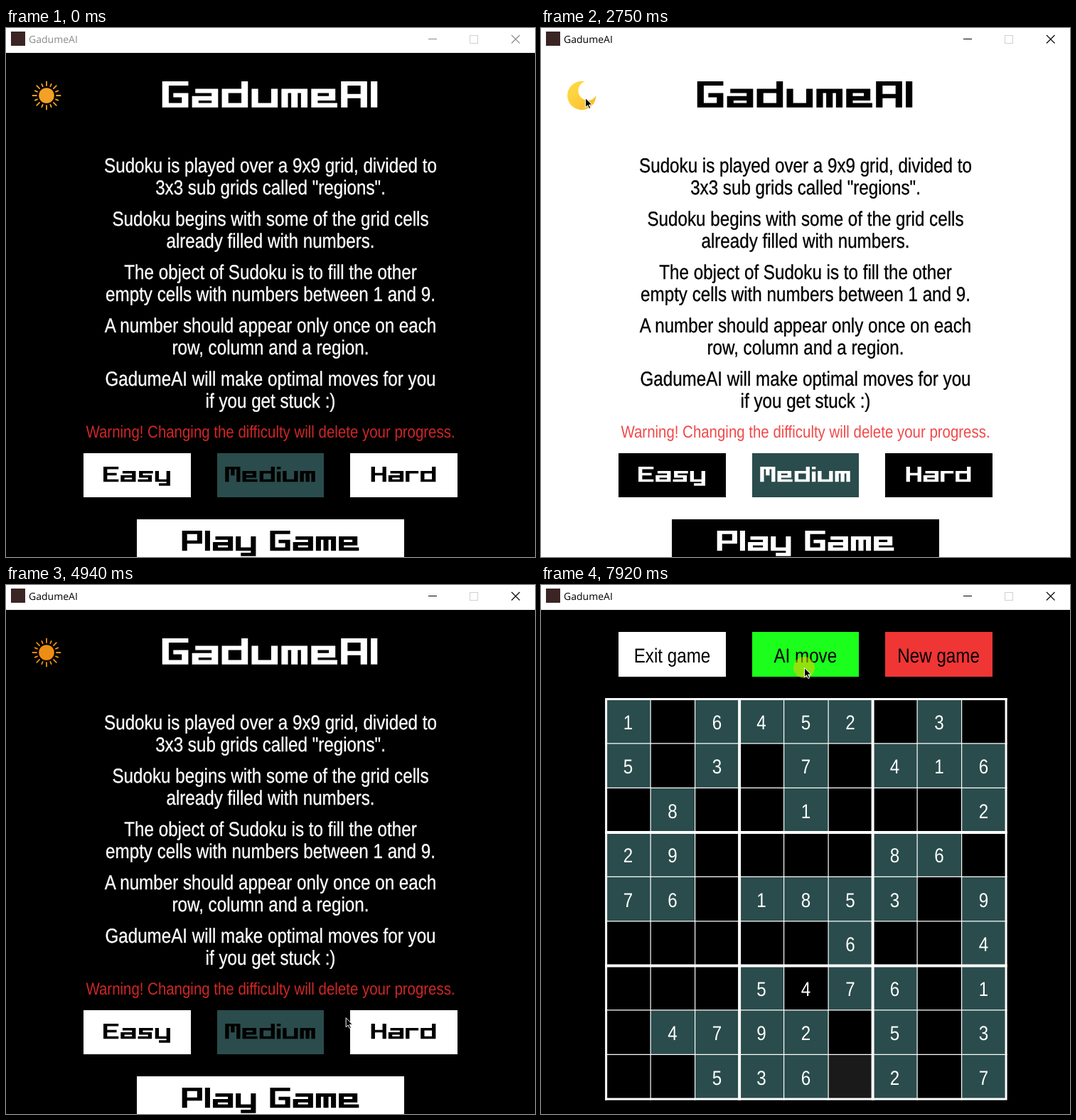
An HTML page for the animation above (8000 ms loop, 744 by 744 pixels).

```html
<!DOCTYPE html>
<html lang="en">
<head>
<meta charset="utf-8">
<title>GadumeAI</title>
<style>
html, body { margin: 0; width: 100%; height: 100%; overflow: hidden; background: #fff; }
svg { display: block; width: 100vw; height: 100vh; --bg: #000; --fg: #fff; --warn: #d02626; --win: #000; }
svg.light { --bg: #fff; --fg: #000; --warn: #f24848; }
svg.idle { --win: #8a8a8a; }
rect { shape-rendering: crispEdges; }
text { font-family: "Liberation Sans", Arial, sans-serif; text-anchor: middle; text-rendering: geometricPrecision; }
.caption { font-family: "Open Sans", sans-serif; text-anchor: start; fill: var(--win); }
.pixel { fill: none; stroke-linecap: square; stroke-linejoin: miter; }
</style>
</head>
<body>
<svg id="stage" viewBox="0 0 744 744"></svg>
<script>
const LOOP = 8000, SLATE = '#2a4c4c';
const stage = document.getElementById('stage');

// Block letters drawn with a 1 x 1 pen, 4 columns by 6 rows
const glyphs = {
  G: 'M3.5 .5H.5V5.5H3.5V3.2H2.2', a: 'M1 2.2H3.5V5.5H.5V3.9H3.5', d: 'M3.5 .5V5.5H.5V2.2H3.5',
  u: 'M.5 2.2V5.5H3.5V2.2', m: 'M.5 5.5V2.2H3.5V5.5M2 2.2V5.5', e: 'M3.5 5.5H.5V2.2H3.2V3.9H.5',
  A: 'M.5 5.5V.5H3.5V5.5M.5 3.4H3.5', I: 'M.5 .5V5.5', E: 'M3.5 .5H.5V5.5H3.5M.5 3H3',
  s: 'M3.5 2.2H.8V3.9H3.2V5.5H.5', y: 'M.5 2.2V5.5H3.5M3.5 2.2V7.1H1.5', M: 'M.5 5.5V.5H3.5V5.5M2 .5V3',
  i: 'M.5 2.4V5.5M.5 .5h.01', H: 'M.5 .5V5.5M3.5 .5V5.5M.5 3H3.5', r: 'M.5 5.5V2.2H2.9',
  P: 'M.5 5.5V.5H3.5V3.4H.5', l: 'M.5 .5V5.5', ' ': ''
};
const narrow = { I: 1, l: 1, i: 1, r: 3.4, ' ': 1.7 };
const GAP = .57;

function pixelText(str, cx, top, unit, color) {
  let x = 0;
  const paths = [...str].map(c => {
    const path = `<path transform="translate(${x} 0)" d="${glyphs[c]}"/>`;
    x += (narrow[c] || 4) + GAP;
    return path;
  }).join('');
  const sx = 1.75 * unit, sy = 7 / 6 * unit;
  return `<g class="pixel" stroke="${color}" transform="translate(${cx - (x - GAP) * sx / 2} ${top}) scale(${sx} ${sy})">${paths}</g>`;
}

const rect = (x, y, w, h, fill, extra = '') =>
  `<rect x="${x}" y="${y}" width="${w}" height="${h}" fill="${fill}" ${extra}/>`;
const text = (str, x, y, size = 24.2, fill = 'var(--fg)', extra = '') =>
  `<text transform="translate(${x} ${y}) scale(1 1.17)" font-size="${size}" fill="${fill}" ${extra}>${str}</text>`;
const bold = 'stroke="var(--fg)" stroke-width=".3"';

function sun() {
  let rays = '';
  for (let i = 0; i < 16; i++)
    rays += `<path d="M0 -14V${i % 2 ? -17.5 : -19.5}" transform="rotate(${i * 22.5})"/>`;
  return `<g id="sun" transform="translate(57 95)" fill="currentColor" stroke="currentColor">
    <g stroke-width="1.8" stroke-linecap="round">${rays}</g><circle r="10.8" stroke="none"/>
    <path id="sunHalf" d="M0 -10.8A10.8 10.8 0 0 0 0 10.8Z" fill="#ffc12c" stroke="none"/></g>`;
}

function menu() {
  const lines = [
    'Sudoku is played over a 9x9 grid, divided to', '3x3 sub grids called "regions".',
    'Sudoku begins with some of the grid cells', 'already filled with numbers.',
    'The object of Sudoku is to fill the other', 'empty cells with numbers between 1 and 9.',
    'A number should appear only once on each', 'row, column and a region.',
    'GadumeAI will make optimal moves for you', 'if you get stuck :)'
  ];
  const levels = ['Easy', 'Medium', 'Hard'].map((name, i) =>
    rect(109.4 + i * 187.5, 597.5, 150.3, 62.5, i === 1 ? SLATE : 'var(--fg)') +
    pixelText(name, 184 + i * 187.5, 617, 3.03, 'var(--bg)'));
  return sun() +
    '<path id="moon" fill="url(#gold)" d="M62 75.3A20.2 20.2 0 1 0 77.500 95A13.500 13.500 0 1 1 62 75.300Z"/>' +
    pixelText('GadumeAI', 371, 75, 5.24, 'var(--fg)') +
    lines.map((s, i) => text(s, 372, 203 + (i >> 1) * 75 + i % 2 * 31, 24.2, 'var(--fg)', bold)).join('') +
    text('Warning! Changing the difficulty will delete your progress.', 372, 575.5, 20.45, 'var(--warn)') +
    levels.join('') +
    rect(184.4, 691, 375.2, 60, 'var(--fg)') + pixelText('Play Game', 372, 707, 4.03, 'var(--bg)');
}

function game() {
  const givens = ['1.6452.3.', '5.3.7.416', '.8..1...2', '29....86.', '76.1853.9',
    '.....6..4', '...5.76.1', '.4792.5.3', '..536.2.7'];
  const step = 62.5, left = 91.6, top = 160.4, side = step * 9;
  const digit = (n, col, row, extra) => text(n, 122.5 + col * step, 202.5 + row * step, 24.2, '#fff', extra);
  let out = ['Exit game', 'AI move', 'New game'].map((s, i) =>
    rect(109.4 + i * 187.5, 66.4, 150.3, 62.4, ['#fff', '#1cff1c', '#f03535'][i]) +
    text(s, 184.5 + i * 187.3, 108.5, 24.2, '#000')).join('');
  givens.forEach((line, row) => [...line].forEach((n, col) => {
    if (n !== '.') out += rect(left + col * step, top + row * step, step, step, SLATE) + digit(n, col, row);
  }));
  out += rect(left + 5 * step, top + 8 * step, step, step, '#1a1a1a');
  for (let i = 0; i < 10; i++) {
    const x = left + i * step, y = top + i * step, w = i % 9 === 0 ? 3 : i % 3 ? 1.2 : 4;
    out += `<path stroke="#fff" stroke-width="${w}" d="M${x} ${top - 1.5}v${side + 3}M${left - 1.5} ${y}h${side + 3}"/>`;
  }
  return out + digit(4, 4, 6, 'id="aiDigit"');
}

stage.innerHTML = `
  <defs><linearGradient id="gold" x2="1" y2="1">
    <stop offset=".3" stop-color="#ffd540"/><stop offset="1" stop-color="#f7b92c"/>
  </linearGradient></defs>
  ${rect(0, 0, 744, 744, 'var(--bg)')}${rect(0, 0, 744, 35, '#fff')}
  ${rect(7, 5, 20, 20, '#3b2424')}
  <text class="caption" x="32" y="21" font-size="14">GadumeAI</text>
  <path d="M594 15.5H606M711 10L722.5 21.5M722.5 10L711 21.5" stroke="var(--win)" stroke-width="1.1"/>
  ${rect(652.5, 10.5, 11, 11, 'none', 'stroke="#d0d0d0"')}
  <g id="menu">${menu()}</g><g id="game">${game()}</g>
  <g id="pointer"><circle id="press" r="15" fill="rgba(255,200,0,.5)"/>
  <path d="M.5 .5V13.5L3.5 10.8L5.7 15.5L7.8 14.6L5.7 10H9.8Z" fill="#000" stroke="#fff"/></g>`;

const el = id => document.getElementById(id);
const show = (id, on) => { el(id).style.display = on ? '' : 'none'; };
const within = (t, a, b) => t >= a && t < b;

// Pointer moves: start, end, number of steps, x, y
const moves = [
  [400, 630, 6, 453, 411], [990, 1320, 8, 280, 305], [1600, 1750, 4, 106, 151],
  [1970, 2390, 9, 62, 98], [4330, 4560, 6, 328, 386], [4790, 4980, 5, 495, 634],
  [5210, 5700, 9, 447, 712], [6330, 6560, 6, 396, 271], [6920, 7020, 3, 382, 119],
  [7300, 7490, 4, 370, 116]
];
const presses = [[2570, 2670], [3640, 3670], [5830, 5860], [7640, 7820], [7920, 8000]];

function pointerAt(t) {
  let x = 643, y = 752;
  for (const [start, end, steps, toX, toY] of moves) {
    if (t < start) break;
    const n = Math.floor((t - start) / (end - start) * (steps - 1) + 1e-6) + 1;
    const p = Math.min(1, n / steps), k = p * p * (3 - 2 * p);
    x += (toX - x) * k;
    y += (toY - y) * k;
  }
  return [x, y];
}

function draw(t) {
  const light = within(t, 2750, 3820), playing = t >= 6100;
  stage.classList.toggle('light', light);
  stage.classList.toggle('idle', t < 2570);
  el('sun').style.color = t < 2570 ? '#f3a126' : t < 2750 ? '#f59b18' : '#ee8d14';
  show('menu', !playing);
  show('game', playing);
  show('sun', !light);
  show('sunHalf', within(t, 2570, 2750));
  show('moon', light);
  show('aiDigit', t >= 7920);
  show('pointer', t >= 400);
  show('press', presses.some(([a, b]) => within(t, a, b)));
  el('pointer').setAttribute('transform', `translate(${pointerAt(t)})`);
}

const origin = performance.now();
function tick() {
  draw((performance.now() - origin) % LOOP);
  requestAnimationFrame(tick);
}
tick();
</script>
</body>
</html>
```
